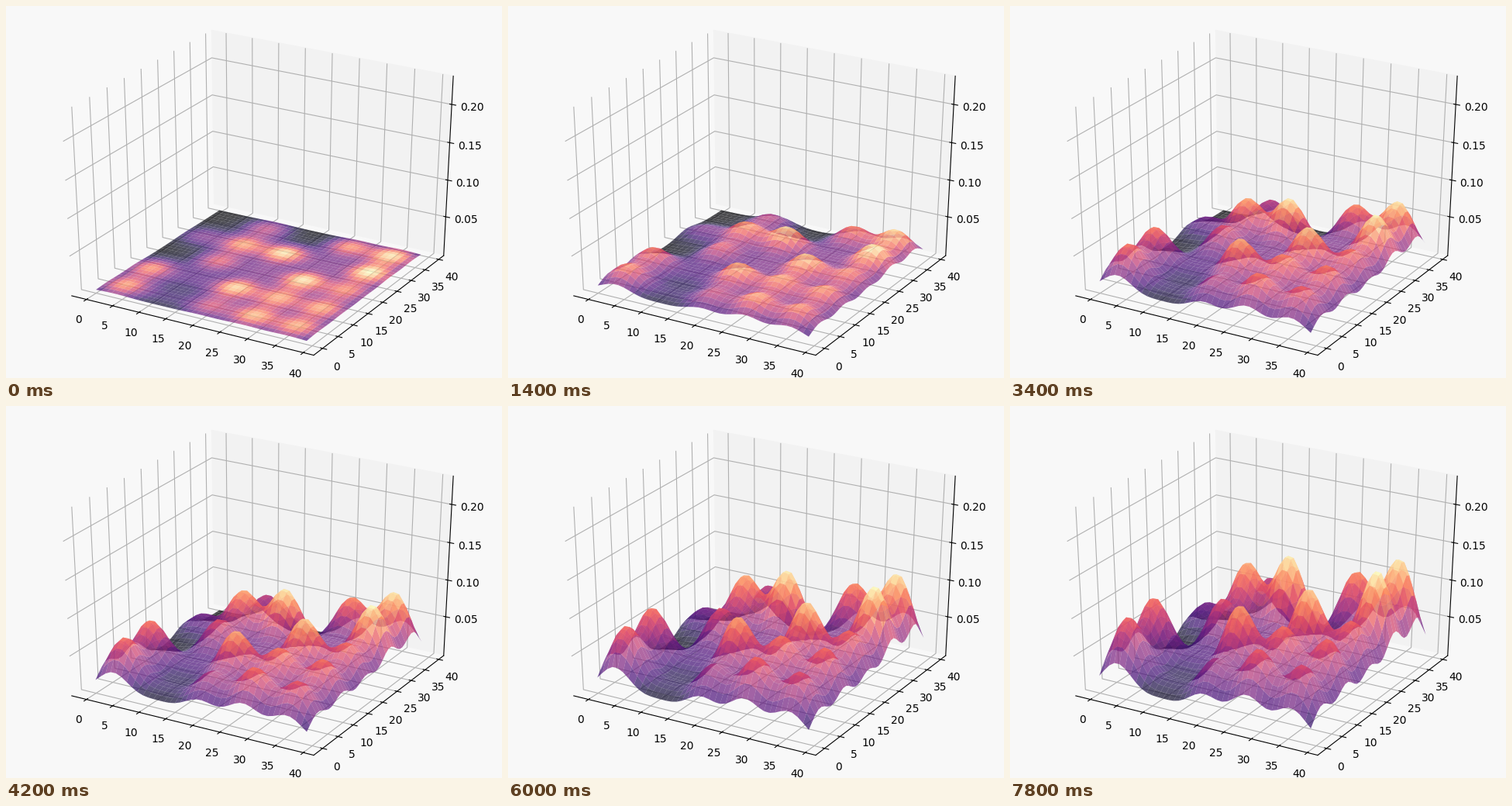
A matplotlib script for the animation above (8 s loop, 640 by 480 pixels).

```python
import numpy as np
import matplotlib.pyplot as plt
from matplotlib.animation import FuncAnimation
from mpl_toolkits.mplot3d import Axes3D
from mpl_toolkits.mplot3d.art3d import Poly3DCollection

FRAMES = 40
SIZE = 40
SIGMA = 2.83
PAPER = "#f8f8f8"

# Final bump heights in thousandths; rows run along y, columns along x.
HEIGHTS = np.array([
    [92, 18, 61, 87, 80],
    [97, 26, 110, 91, 90],
    [2, 84, 40, 122, 89],
    [46, 110, 134, 40, 136],
    [1, 72, 1, 104, 132],
]) / 1000

CENTRES = 3.5 + 8 * np.arange(5)
CX, CY = np.meshgrid(CENTRES, CENTRES)
# Bumps near the front right corner level off sooner.
HALF = np.minimum(58, 28 + 1.1 * (CY - 3.5) + 0.35 * (35.5 - CX))

GRID = np.arange(SIZE)
X, Y = np.meshgrid(GRID, GRID)
KERNEL = np.exp(-(GRID[:, None] - CENTRES) ** 2 / (2 * SIGMA ** 2))


class StretchedAxes3D(Axes3D):
    """3D axes that fill their rectangle instead of staying square."""

    def apply_aspect(self, position=None):
        pass


def growth(step):
    return step / (step + HALF)


def surface(i):
    bumps = HEIGHTS * growth(i + 0.7) / growth(FRAMES - 0.3)
    return KERNEL @ bumps @ KERNEL.T


def quads(z):
    pts = np.stack([X, Y, z], axis=-1)
    cells = np.stack([pts[:-1, :-1], pts[:-1, 1:], pts[1:, 1:], pts[1:, :-1]],
                     axis=2)
    return cells.reshape(-1, 4, 3)


def padded(low, high):
    pad = (high - low) / 48
    return low - pad, high + pad


fig = plt.figure(figsize=(6.4, 4.8), dpi=100, facecolor=PAPER)
ax = StretchedAxes3D(fig, [0, 0, 1, 1], elev=30, azim=-60)
fig.add_axes(ax)
ax.set_facecolor(PAPER)
ax.set_box_aspect((1, 1, 1), zoom=np.sqrt(3) / 1.8294640721620434)

mesh = Poly3DCollection(quads(surface(0)), cmap="magma", alpha=0.7,
                        linewidths=0)
ax.add_collection3d(mesh)

ax.set_xticks(range(0, 41, 5))
ax.set_yticks(range(0, 41, 5))
ax.set_zticks([0.05, 0.10, 0.15, 0.20])
ax.set_xlim(*padded(-1.95, 40.95))
ax.set_ylim(*padded(-1.95, 40.95))
ax.set_zlim(*padded(0.0007, 0.2316))
for axis, color in ((ax.xaxis, PAPER), (ax.yaxis, "#f2f2f2"),
                    (ax.zaxis, PAPER)):
    axis.set_pane_color(color)


def draw(i):
    cells = quads(surface(i))
    level = cells[:, :, 2].mean(axis=1)
    mesh.set_verts(cells)
    mesh.set_array(level)
    mesh.set_clim(level.min(), level.max())
    return [mesh]


anim = FuncAnimation(fig, draw, frames=FRAMES, interval=200, repeat=True,
                     repeat_delay=0, blit=False)
plt.show()
```
